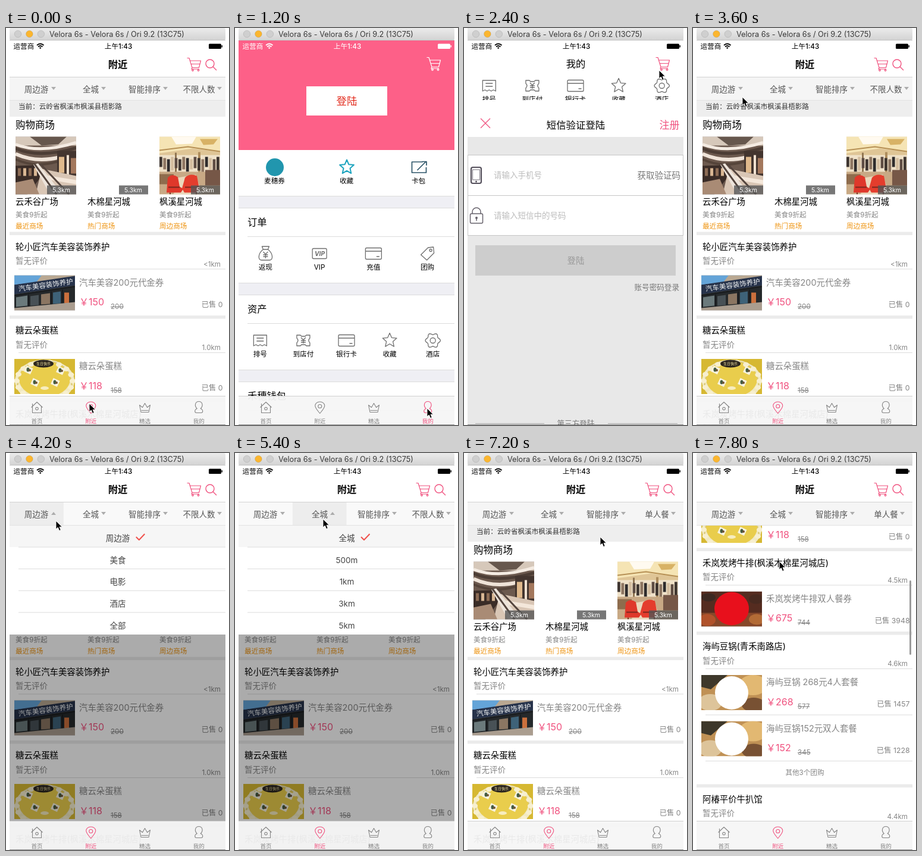
Recreate the animation shown at these times as an HTML page. Size 375 by 667 pixels, loop 8 s.

```html
<!DOCTYPE html>
<html lang="zh-CN">
<head>
<meta charset="utf-8">
<title>附近</title>
<style>
html, body { margin: 0; width: 100%; height: 100%; overflow: hidden; background: #fff; }
svg { display: block; }
text { font-family: Inter, "Noto Sans CJK SC", "Noto Sans CJK", sans-serif; white-space: pre; }
</style>
</head>
<body>
<svg id="stage" width="375" height="667" viewBox="0 0 375 667"></svg>
<script>
const PINK = '#f0527f', GRAY = '#858585', ORANGE = '#ee930f', LINE = '#dcdcdc', BAND = '#ebebeb';
const STEP = 600, LOOP = 8000;

// One pose per step: pointer position plus whatever is open
const poses = [
  { at: [140, 631] },
  { at: [318, 634] },
  { at: [323, 639], mine: true },
  { at: [328, 71], mine: true, scroll: 428 },
  { at: [328, 71], mine: true, scroll: 428, sheet: 101 },
  { at: [36, 60], mine: true, scroll: 428, sheet: 0 },
  { at: [83, 116] },
  { at: [84, 114], menu: 0 },
  { at: [110, 114], menu: 0 },
  { at: [148, 111], menu: 1 },
  { at: [238, 112], menu: 2 },
  { at: [229, 141], menu: 3 },
  { at: [229, 141], party: '单人餐' },
  { at: [145, 182], party: '单人餐', scroll: 464 }
];

// Drawing helpers; text is placed by its vertical centre
const T = (x, y, s, size = 11.6, fill = '#000', anchor = 'start', more = '') =>
  `<text x="${x}" y="${y + size * .365}" font-size="${size}" fill="${fill}" text-anchor="${anchor}" ${more}>${s}</text>`;
const M = (x, y, s, size, fill, more) => T(x, y, s, size, fill, 'middle', more);
const E = (x, y, s, size, fill) => T(x, y, s, size, fill, 'end');
const R = (x, y, w, h, fill, more = '') =>
  `<rect x="${x}" y="${y}" width="${w}" height="${h}" fill="${fill}" ${more}/>`;
const wide = (y, h, fill) => R(6, y, 363, h, fill);
const rule = (y, fill = LINE) => R(21, y, 348, 1, fill);
const shape = (d, fill) => `<path d="${d}" fill="${fill}"/>`;
const stroke = (d, color, w) => `<path d="${d}" fill="none" stroke="${color}" stroke-width="${w}" stroke-linejoin="round"/>`;
const oval = (x, y, rx, ry, fill) => `<ellipse cx="${x}" cy="${y}" rx="${rx}" ry="${ry}" fill="${fill}"/>`;
const move = (x, y, s) => `<g transform="translate(${x} ${y})">${s}</g>`;
const repeat = (n, f) => Array.from({ length: n }, (_, i) => f(i)).join('');
const ring = (x, y, r) => `M${x - r} ${y}a${r} ${r} 0 1 0 ${2 * r} 0a${r} ${r} 0 1 0 ${-2 * r} 0`;
const polar = (n, radius) => 'M' + Array.from({ length: n }, (_, i) => {
  const a = i / n * 2 * Math.PI - Math.PI / 2, r = radius(i, a);
  return `${(r * Math.cos(a)).toFixed(1)} ${(r * Math.sin(a)).toFixed(1)}`;
}).join('L') + 'Z';
const box = (w, h, r = 2) => `M${r - w} ${-h}H${w - r}Q${w} ${-h} ${w} ${r - h}V${h - r}Q${w} ${h} ${w - r} ${h}H${r - w}Q${-w} ${h} ${-w} ${h - r}V${r - h}Q${-w} ${-h} ${r - w} ${-h}Z`;

const icons = {
  cart: 'M-11.500 -10.500H-8L-3 5.500H8.500L11.500 -6H-6.500M-5 -0.500H10M-3 5.500L-4 8H9' + ring(-2, 10, 1.3) + ring(7.5, 10, 1.3),
  search: ring(-1.5, -1, 7) + 'M3.500 4L9.500 10',
  home: 'M-9.500 0L0 -9L9.500 0M-7.500 -1.500V9H7.500V-1.500M-7.500 -2V-6.500' + ring(0, 2, 2.2),
  pin: 'M0 10C-4 5 -8 1 -8 -3A8 6.500 0 0 1 8 -3C8 1 4 5 0 10Z' + ring(0, -2, 3),
  crown: 'M-9 -4L-6.500 8H6.500L9 -4L4 0L0 -7L-4 0ZM-6 5H6',
  person: 'M-3 2C-8 -3 -6 -10 0 -10S8 -3 3 2C8 4 7 9 4 9H-4C-7 9 -8 4 -3 2Z',
  star: polar(10, i => i % 2 ? 5.8 : 12.5),
  gear: polar(48, (i, a) => 11.2 + 1.5 * Math.cos(6 * a)) + ring(0, 0, 4.5),
  share: 'M6 -9H-12V9H12V0M-3 5L11 -9M5 -9.500H12.500V-3',
  bag: 'M-4 -7L-6 -12H6L4 -7ZM-4 -7C-13 0 -13 11 -7 11H7C13 11 13 0 4 -7M-4 -3L0 1L4 -3M0 1V8M-4 2H4M-4 5H4',
  card: box(13.5, 9.5) + 'M-13.500 -4H13.500M5 5H10',
  tag: 'M-11 2L1 -10L10 -11L11 -1L-1 11Z' + ring(5.5, -5.5, 2),
  queue: 'M-11 9V-9H11V9L7 7L3.500 9L0 7L-3.500 9L-7 7ZM-6 -4H6M-6 1H6',
  ticket: 'M-11 -9H-5L-3 -7H3L5 -9H11V-4Q7 0 11 4V9H5L3 7H-3L-5 9H-11V4Q-7 0 -11 -4ZM-4 -5L0 -1L4 -5M0 -1V5M-4 0H4M-4 3H4',
  vip: box(12, 8.5)
};
const icon = (name, x, y, color = '#6e6e6e', w = 1.3) => move(x, y, stroke(icons[name], color, w));
const check = (x, y) => move(x, y, stroke('M-7 0L-2 5L7.500 -5', '#f0524d', 2));

// Flat stand-ins for the photographs
const photo = (x, y, w, h, body) => `<svg x="${x}" y="${y}" width="${w}" height="${h}">${body}</svg>`;
const mall = R(0, 0, 102, 97, '#6c594e') +
  R(0, 0, 102, 15, '#d6c8ba') + shape('M24 0H86L72 13L44 15Z', '#66574d') +
  stroke('M0 13Q42 29 102 10', '#f4ebe2', 5) + stroke('M0 20Q40 37 102 19', '#4c3d35', 5) +
  stroke('M0 29Q36 45 76 34', '#efe3d8', 6) + stroke('M0 38Q32 53 70 42', '#55443a', 4) +
  R(70, 24, 32, 44, '#43352f') + R(73, 34, 9, 27, '#dfb98c') + R(86, 31, 4, 33, '#efe0d0') + R(93, 36, 9, 26, '#a3785d') +
  shape('M0 49L36 48L44 66L20 97H0Z', '#3a2c27') + repeat(4, i => R(4 + i * 9, 53, 5, 13, i % 2 ? '#d9b794' : '#8d6c55')) +
  shape('M44 54L102 66V97H34Z', '#d9c6b5') + shape('M52 65L102 73V80L60 73Z', '#f4e7da') +
  shape('M30 47L38 45L79 97H58Z', '#ede4db') + stroke('M32 46L69 97M42 46L90 97', '#54453e', 3) +
  shape('M0 77L29 71L40 97H0Z', '#a98b75');
const boutique = R(0, 0, 102, 97, '#dfc596') +
  shape('M0 0H102V25L56 20L0 28Z', '#f5e4b4') + shape('M20 0H62L55 12L28 13Z', '#fffaf0') +
  shape('M68 4H98L91 13L74 14Z', '#d8b265') + stroke('M0 23L48 17L102 25', '#b69055', 2) +
  R(0, 31, 102, 32, '#f0e2c9') + R(26, 27, 3, 40, '#917653') + R(65, 26, 4, 41, '#ae8d5d') +
  repeat(16, i => R(i * 6.4, 34 + i % 3 * 2, 4.8, 17 + i % 4 * 2, ['#403732', '#8d7561', '#2e2b2c', '#d4bea0', '#5e4d44'][i % 5])) +
  R(0, 59, 102, 38, '#c8a985') + shape('M0 63H24V80H0Z', '#8e6c4d') + R(77, 56, 25, 26, '#765747') +
  shape('M31 69L61 64L72 97H24Z', '#ead8bc') +
  shape('M14 69Q21 61 31 68L34 84L40 88L36 94H12Z', '#df382b') +
  shape('M43 69Q51 61 63 66L67 87L61 94H42L38 87Z', '#e43d2d') +
  stroke('M15 85H34M43 85H64M18 94V97M62 93V97', '#7b281f', 2);
const garage = R(0, 0, 102, 59, '#65615f') + shape('M0 0H70L34 12L0 16Z', '#64a4d8') +
  shape('M46 0H102V6L36 13Z', '#b9a892') + shape('M0 16L102 1V17L0 32Z', '#27334b') +
  '<g transform="rotate(-8 6 24)">' + T(7, 23, '汽车美容装饰养护', 11.6, '#f3f5f5', 'start', 'font-weight="500"') + '</g>' +
  shape('M0 32L102 17V46L0 56Z', '#25292b') + shape('M3 37L22 34V51L3 53Z', '#6b7a7c') +
  shape('M27 35L41 33V50L27 51Z', '#485156') + shape('M45 32L60 30V48L45 49Z', '#8b7662') +
  shape('M65 29L78 27V47L65 48Z', '#3e6278') + R(84, 29, 8, 18, '#cb703d') +
  stroke('M0 34L102 19M24 32V55M62 27V50M81 24V49', '#191c1f', 2) + shape('M0 55L102 45V59H0Z', '#aa9d8f');
const cake = R(0, 0, 102, 59, '#d6b832') + oval(51, 37, 50, 36, '#f1e9c2') +
  stroke('M5 48Q7 4 51 4Q95 4 97 48', '#d9c774', 2) + oval(51, 34, 43, 30, '#e9cd4c') +
  repeat(18, i => oval(51 + 47 * Math.cos(i * .35), 37 + 32 * Math.sin(i * .35), 5, 4, '#f7efcf')) +
  oval(49, 8, 17, 6.5, '#2d271f') + M(49, 8, '生日快乐', 6, '#f6e7a4') +
  [[24, 18], [78, 19], [35, 39], [69, 39]].map(([x, y]) =>
    R(x - 6, y - 5, 12, 11, '#f7f3e0', `transform="rotate(25 ${x} ${y})"`) + oval(x - 1, y, 2.5, 3.5, '#435d43') + oval(x + 2, y + 1, 2, 2, '#725536')).join('') +
  oval(51, 49, 7, 3, '#f7edbf');
const steak = R(0, 0, 102, 59, '#552c20') + R(0, 36, 102, 23, '#87482a') +
  oval(10, 48, 14, 10, '#b0522b') + oval(93, 47, 13, 9, '#b36b36') + oval(12, 10, 12, 7, '#3c2922') +
  oval(92, 13, 12, 8, '#482a20') + oval(51, 29, 29, 28, '#e8101c');
const hotpot = R(0, 0, 102, 59, '#c09155') + shape('M0 0H44L16 24L0 20Z', '#3e382b') +
  oval(87, 17, 24, 17, '#e2b872') + oval(15, 46, 20, 14, '#ddc49a') + oval(88, 50, 20, 12, '#785133') +
  oval(51, 30, 28, 28, '#fff');

// Nearby page
const tagged = (x, pic) => photo(x, 182.5, 102, 97, pic) + R(x + 53, 264.5, 49, 15, 'rgba(85,85,85,.8)') +
  M(x + 77, 272, '5.3km', 10.5, '#fff');
const malls = [['云禾谷广场', '最近商场', mall], ['木棉星河城', '热门商场', ''], ['枫溪星河城', '周边商场', boutique]];

const deal = (y, pic, [name, price, old, sold]) => photo(14, y, 102, 59, pic) +
  T(123, y + 12, name, 14.4, GRAY) + T(123, y + 45, '￥' + price, 16, PINK) +
  T(176, y + 52.5, old, 11.6, GRAY, 'start', 'text-decoration="line-through"') +
  E(364.5, y + 49, '已售 ' + sold, 12.3, GRAY);
const shop = (y, name, km, pic, deals) => wide(y, 5.5, BAND) + T(16, y + 25, name, 14.4) +
  T(16, y + 49, '暂无评价', 13.5, GRAY) + E(361, y + 54, km, 11.6, GRAY) +
  deals.map((d, i) => rule(y + 62 + i * 77.5) + deal(y + 73 + i * 77.5, pic, d)).join('');

const feed = wide(121, 28, '#eeeeee') + T(21, 131.5, '当前：云岭省枫溪市枫溪县梧影路', 11.6, '#333') +
  T(16, 163, '购物商场', 16.5) +
  malls.map(([name, note, pic], i) => {
    const x = 16 + i * 121;
    return tagged(x, pic) + T(x, 292, name, 14.4) + T(x, 314, '美食9折起', 11.6, GRAY) + T(x, 333, note, 11.6, ORANGE);
  }).join('') +
  shop(342.5, '轮小匠汽车美容装饰养护', '&lt;1km', garage, [['汽车美容200元代金券', 150, 200, 0]]) +
  shop(483, '糖云朵蛋糕', '1.0km', cake, [['糖云朵蛋糕', 118, 158, 0]]) +
  shop(623.5, '禾岚炭烤牛排(枫溪木棉星河城店)', '4.5km', steak, [['禾岚炭烤牛排双人餐券', 675, 744, 3948]]) +
  shop(764, '海屿豆锅(青禾南路店)', '4.6km', hotpot, [
    ['海屿豆锅 268元4人套餐', 268, 577, 1457], ['海屿豆锅152元双人套餐', 152, 345, 1228]]) +
  rule(981) + M(188, 1001, '其他3个团购', 11.6, GRAY) +
  shop(1020.5, '阿椿平价牛扒馆', '4.4km', '', []) + rule(1082);

const filters = [['周边游', 51, 80], ['全城', 142.5, 164], ['智能排序', 233, 268], ['不限人数', 324.5, 359]];
const lists = [
  ['周边游', '美食', '电影', '酒店', '全部'],
  ['全城', '500m', '1km', '3km', '5km'],
  ['智能排序', '离我最近', '好评优先', '价格最低', '人气最高']
];

function filterBar({ menu, party }) {
  return wide(82, 1, '#d2d2d2') + wide(83, 38, menu === undefined ? '#f5f5f5' : '#f9f9f9') +
    filters.map(([label, x, caret], i) => {
      const on = menu === i, swap = i === 3 && party;
      const cx = swap ? 352 : caret;
      return (on ? R(6 + i * 90.75, 83, 90.75, 38, '#ededed') : '') + M(x, 103, swap ? party : label, 13.5, '#555') +
        shape(on ? `M${cx - 4} 104h8l-4 -5z` : `M${cx - 4} 99h8l-4 5z`, '#acacac');
    }).join('') + wide(121, 1, '#e2e2e2');
}

function dropdown(menu) {
  const pair = menu === 3, h = pair ? 74 : 184;
  let s = wide(121, 546, 'rgba(0,0,0,.33)') + wide(121, h, '#fff');
  if (pair) {
    s += R(6, 122, 181, 36, '#f6f6f6') + wide(158, 1, LINE) + R(187, 122, 1, 73, LINE) + check(170, 139.5);
    ['不限人数', '单人餐', '双人餐', '3~4人餐'].forEach((t, i) =>
      s += M(i % 2 ? 278.5 : 97, i < 2 ? 140 : 177, t, 13.5, '#444'));
  } else {
    s += wide(122, 36, '#f6f6f6') + check(188 + lists[menu][0].length * 6.75 + 17.5, 141);
    lists[menu].forEach((t, i) =>
      s += M(188, 143 + i * 36.7, t, 13.5, '#444') + (i ? rule(121 + i * 36.6) : ''));
  }
  return s;
}

function nearby(p) {
  return move(0, -(p.scroll || 0), feed) + (p.menu === undefined ? '' : dropdown(p.menu)) +
    wide(20, 62, '#fff') + M(188, 61.5, '附近', 16.3, '#000', 'font-weight="600"') +
    icon('cart', 316, 61, PINK, 1.2) + icon('search', 344.5, 61, PINK, 1.4) + filterBar(p) +
    (p.scroll ? R(364, 214, 3, 125, '#9b9b9b', 'rx="1.5"') : '');
}

// Personal page
const row = (y, list) => list.map(([name, label], i) => {
  const x = 6 + (i + .5) * 363 / list.length;
  return icon(name, x, y) + M(x, y + 23, label, 11.6);
}).join('');
const section = (y, title, items) => wide(y, 126, '#fff') + wide(y, 1, LINE) + wide(y + 126, 1, LINE) +
  T(21, y + 24, title, 16.3) + rule(y + 48) + row(y + 77, items);

const profile = wide(20, 1080, '#efeff4') + wide(20, 185, '#fd6088') + R(120, 98, 136, 49, '#fff') +
  M(188, 122.5, '登陆', 17.4, '#e22b1d') +
  wide(205, 77, '#fff') + wide(282, 1, LINE) + oval(67, 234, 15, 15, '#2196ae') +
  icon('star', 188, 234, '#1ba3be', 2) + icon('share', 309.5, 234, '#2c5468', 1.7) +
  ['麦穗券', '收藏', '卡包'].map((t, i) => M(66.5 + i * 121, 256.5, t)).join('') +
  section(302, '订单', [['bag', '返现'], ['vip', 'VIP'], ['card', '充值'], ['tag', '团购']]) +
  M(142.5, 379.5, 'VIP', 10, '#666', 'font-weight="700" font-style="italic"') +
  section(448, '资产', [['queue', '排号'], ['ticket', '到店付'], ['card', '银行卡'], ['star', '收藏'], ['gear', '酒店']]) +
  section(594, '禾穗钱包', []);

function mine({ scroll }) {
  return move(0, -(scroll || 0), profile) +
    (scroll ? wide(20, 62, '#fff') + M(188, 60, '我的', 16.3, '#000', 'font-weight="500"') : '') +
    icon('cart', 334, 60, scroll ? PINK : '#fff', 1.2);
}

const login = wide(20, 62, '#fff') + stroke('M28 51l16 16M44 51l-16 16', PINK, 1.3) +
  M(188, 62, '短信验证登陆', 16.4) + E(362.5, 62, '注册', 17, PINK) +
  wide(82, 585, '#e8e8e8') + R(6.5, 112.5, 362, 135, '#fff', 'stroke="#c6c6c6"') + wide(180, 1, '#c6c6c6') +
  R(12, 133, 17, 27, '#fff', 'rx="3" stroke="#55505c" stroke-width="2.2"') + R(14.5, 137, 12, 17, '#fff', 'stroke="#77727d"') +
  oval(20.5, 157, 1.5, 1.5, '#55505c') +
  R(10.5, 211, 21, 16, '#fff', 'rx="2" stroke="#66616b" stroke-width="1.5"') +
  stroke('M14 211v-3a7 7 0 0 1 14 0v3M21 218v5', '#66616b', 1.5) + oval(21, 218, 2, 2, '#66616b') +
  T(50, 146, '请输入手机号', 13.5, '#bcbcbc') + E(364, 147, '获取验证码', 14.5, '#777') +
  T(50, 214, '请输入短信中的号码', 13.5, '#bcbcbc') +
  R(19, 264, 337, 51, '#cdcdcd') + M(188, 290, '登陆', 14.5, '#999') + E(362, 334.5, '账号密码登录', 12.6, '#777') +
  R(19, 563, 116, 1, '#aaa') + R(242, 563, 117, 1, '#aaa') + M(188, 563, '第三方登陆', 12.6, '#777');

// Shared chrome
const tabs = [['home', '首页'], ['pin', '附近'], ['crown', '精选'], ['person', '我的']];
const tabBar = on => wide(618, 49, 'rgba(246,246,246,.95)') + wide(618, 1, '#cfcfcf') + tabs.map(([name, label], i) => {
  const x = 52 + i * 90.75, c = i === on ? PINK : '#858585';
  return icon(name, x, 637.5, c, 1.1) + M(x, 660, label, 9.6, c);
}).join('');

const statusBar = c => T(12.5, 31, '运营商', 11.6, c) +
  stroke('M52 29q5.500 -5 11.500 0M54 31.500q3.500 -3 7.500 0', c, 1.7) + oval(57.7, 33.5, 1.4, 1.3, c) +
  M(189, 31, '上午1:43', 11.6, c, 'font-weight="500"') + R(341, 26.5, 21, 8.5, c, 'rx="1.5"') + R(362.5, 29, 1.5, 3.5, c);

const titleBar = '<defs><linearGradient id="bar" x2="0" y2="1"><stop stop-color="#ebebeb"/><stop offset="1" stop-color="#d3d3d3"/></linearGradient></defs>' +
  R(6, 0, 363, 20.5, 'url(#bar)', 'rx="3"') + wide(20, 1, '#c4c4c4') +
  ['#cfcfcf', '#fbb62f', '#cfcfcf'].map((c, i) => `<circle cx="${20 + i * 19.4}" cy="10" r="5.8" fill="${c}" stroke="rgba(0,0,0,.14)" stroke-width=".8"/>`).join('') +
  T(73, 10.5, 'Velora 6s - Velora 6s / Ori 9.2 (13C75)', 12.7, '#383838');

const pointer = ([x, y]) => move(x, y,
  '<path d="M0 0V14L3.300 11L5.600 16.500L8.200 15.400L6 10.200H10.400Z" fill="#000" stroke="#fff" stroke-width=".9"/>');

function scene(p) {
  const sheet = p.sheet !== undefined;
  return (p.mine ? mine(p) : nearby(p)) + tabBar(p.mine ? 3 : 1) + (sheet ? move(0, p.sheet, login) : '') +
    statusBar(p.mine && !p.scroll ? '#fff' : '#000') + titleBar + wide(666, 1, 'rgba(0,0,0,.4)') + pointer(p.at);
}

const stage = document.getElementById('stage');
const start = performance.now();
let shown = -1;
function tick() {
  const i = Math.floor((performance.now() - start) % LOOP / STEP);
  if (i !== shown) stage.innerHTML = scene(poses[shown = i]);
  requestAnimationFrame(tick);
}
tick();
</script>
</body>
</html>
```
